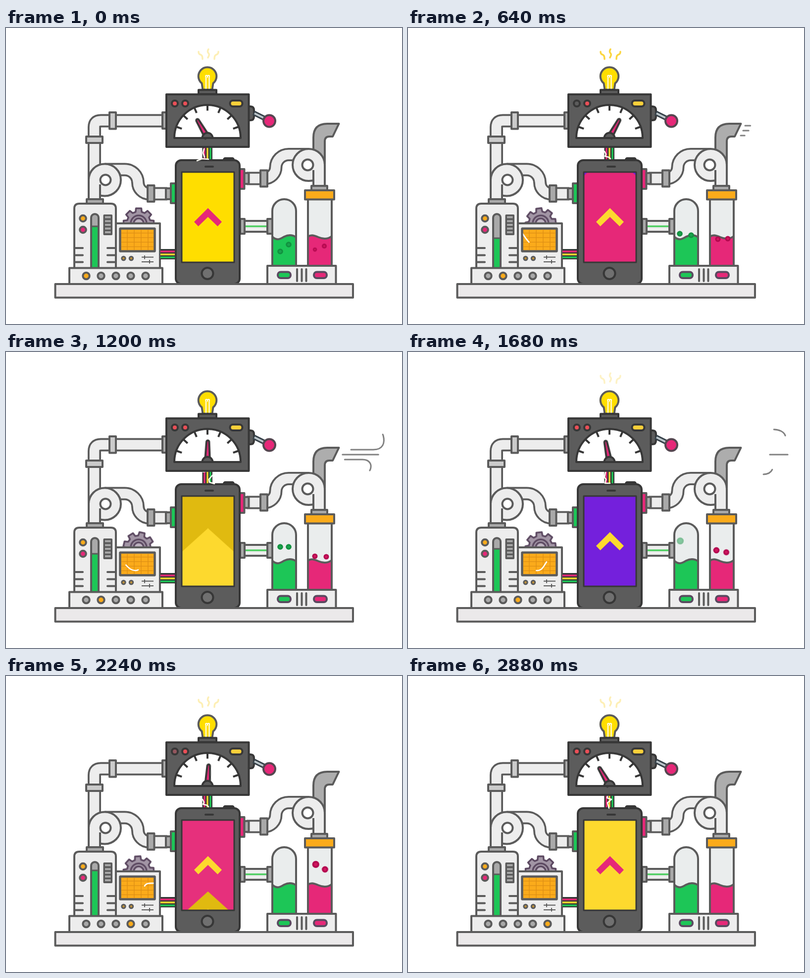
These frames come from a looping animation (800 by 600 pixels, 2.92 s). An HTML page:

```html
<!DOCTYPE html>
<html lang="en">
<head>
<meta charset="utf-8">
<title>Idea machine</title>
<style>
html, body { margin: 0; width: 100%; height: 100%; overflow: hidden; background: #fff; }
svg {
  display: block; width: 800px; height: 600px;
  --line: #5b5b5b; --dark: #373737; --body: #5c5c5c; --light: #ededed; --grey: #a9a9a9;
  --pink: #e62878; --sun: #fdd92e; --green: #1dc657; --orange: #fbab1b; --purple: #7420dc;
  fill: none; stroke: var(--line); stroke-width: 4; stroke-linejoin: round;
}
.light { fill: var(--light); }
.grey { fill: var(--grey); }
.mid { fill: #cbcbcb; }
.body { fill: var(--body); stroke: var(--dark); }
.pink { fill: var(--pink); }
.green { fill: var(--green); }
.orange { fill: var(--orange); }
.yellow { fill: #ffde00; }
.glass { fill: #eaeded; }
.flat { stroke: none; }
.dk { stroke: var(--dark); }
.thin { stroke-width: 2; }
.cap { stroke-linecap: round; }
.outer { stroke-width: 27; }
.inner { stroke: var(--light); stroke-width: 19.5; }
.white { stroke: #fff; }

.anim, .stage *, .lamp { animation: 2.92s linear infinite; }

/* Phone screen */
.stage .shade { animation-delay: -.06s; }
.s1 * { animation-name: rise1; } .s2 * { animation-name: rise2; }
.s3 * { animation-name: rise3; } .s4 * { animation-name: rise4; }
.s5 * { animation-name: rise5; } .s6 * { animation-name: rise6; }
@keyframes rise1 { 0%, 2.05% { transform: none; animation-timing-function: ease-in } 10.96%, 100% { transform: translateY(-235px) } }
@keyframes rise2 { 0%, 12.3% { transform: none } 21.92% { transform: translateY(-223px) } 22.7%, 100% { transform: translateY(-235px) } }
@keyframes rise3 { 0%, 37% { transform: none } 41.1% { transform: translateY(-116px) } 43.15%, 100% { transform: translateY(-235px) } }
@keyframes rise4 { 0%, 47.3% { transform: none; animation-timing-function: ease-in } 55.5%, 100% { transform: translateY(-235px) } }
@keyframes rise5 { 0%, 67.1% { transform: none } 69.86% { transform: translateY(-53px) } 71.9% { transform: translateY(-79px) } 75.3%, 100% { transform: translateY(-235px) } }
@keyframes rise6 { 0%, 76% { transform: none; animation-timing-function: ease-in } 84.2%, 100% { transform: translateY(-235px) } }
#arrow { animation-name: arrow; }
@keyframes arrow {
  0%, 6.5%, 44.5%, 49.5%, 83%, 100% { fill: #e62878 }
  7.5%, 43.2%, 50.5%, 81% { fill: #fdd92e }
}

/* Meter and bulb */
#needle { transform-origin: 407px 222px; animation-name: needle; animation-timing-function: ease-in-out; }
@keyframes needle {
  0%, 98.63%, 100% { transform: rotate(-30deg) } 21.92% { transform: rotate(29deg) }
  41.1% { transform: rotate(1deg) } 57.53% { transform: rotate(-11deg) }
  69.86% { transform: rotate(7deg) } 86.3% { transform: rotate(-3deg) }
}
#led { animation-name: led; }
@keyframes led {
  0%, 41.1%, 57.53%, 98.63%, 100% { fill: #ea4f57 }
  21.92% { fill: #5c5c5c } 69.86%, 86.3% { fill: #93565e }
}
#rays { stroke: #fbd640; stroke-width: 3.5; animation-name: rays; }
@keyframes rays {
  0%, 98.63%, 100% { opacity: .38 } 21.92% { opacity: 1 } 41.1% { opacity: 0 }
  57.53% { opacity: .3 } 69.86% { opacity: .5 } 86.3% { opacity: .22 }
}
#spark { stroke: #fffdf0; stroke-width: 2.6; animation-name: spark; animation-timing-function: step-end; }
@keyframes spark {
  0%, 30%, 64% { d: path("M400 245L398 253L401 262M386 269L396 265L409 266") }
  6%, 21.2%, 74% { d: path("M397 250L400 256L398 260L406 262L409 265") }
  12%, 40.4%, 90% { d: path("M398 243L410 241L421 239M417 250L410 258L411 264L421 267") }
  18%, 57%, 80% { d: path("M399 243L397 254L400 258L398 266L408 266") }
  36%, 69.2% { d: path("M398 242L417 241L418 252L409 262") }
  50%, 86% { d: path("M400 244L408 247L405 254L410 260L402 267") }
  98.2%, 100% { d: path("M405 238L402 247L411 250L403 257L406 268") }
}

/* Left machines */
#level { animation-name: level; }
@keyframes level {
  0%, 98.63%, 100% { transform: translateY(402px) } 21.92% { transform: translateY(426px) }
  41.1% { transform: translateY(409px) } 57.53% { transform: translateY(399px) }
  69.86% { transform: translateY(392px) } 86.3% { transform: translateY(397px) }
}
#gear { fill: #a295a5; stroke: #5d4a62; stroke-width: 3.5; transform-origin: 268px 396px; animation-name: gear; }
@keyframes gear {
  0% { transform: none } 21.92% { transform: rotate(38deg) } 41.1% { transform: rotate(58deg) }
  57.53%, 69.86% { transform: rotate(84deg) } 86.3%, 100% { transform: rotate(90deg) }
}
#trace { stroke-width: 2.6; stroke-dasharray: 34 300; animation-name: trace; }
@keyframes trace {
  0%, 4% { stroke-dashoffset: 40 } 21.92% { stroke-dashoffset: 8 } 41.1% { stroke-dashoffset: -20 }
  57.53% { stroke-dashoffset: -43 } 69.86% { stroke-dashoffset: -62 }
  86.3% { stroke-dashoffset: -92 } 91%, 100% { stroke-dashoffset: -104 }
}
.lamp { fill: var(--orange); animation-timing-function: step-end; }
.lamp:nth-child(1) { animation-name: lamp1; } .lamp:nth-child(2) { animation-name: lamp2; }
.lamp:nth-child(3) { animation-name: lamp3; } .lamp:nth-child(4) { animation-name: lamp4; }
.lamp:nth-child(5) { animation-name: lamp5; }
@keyframes lamp1 { 0% { fill: #fbab1b } 20.5%, 100% { fill: #a9a9a9 } }
@keyframes lamp2 { 0%, 43.1% { fill: #a9a9a9 } 20.5% { fill: #fbab1b } }
@keyframes lamp3 { 0%, 65.7% { fill: #a9a9a9 } 43.1% { fill: #fbab1b } }
@keyframes lamp4 { 0%, 88.3% { fill: #a9a9a9 } 65.7% { fill: #fbab1b } }
@keyframes lamp5 { 0% { fill: #a9a9a9 } 88.3% { fill: #fbab1b } }

/* Bubbles and wind */
.bubble { stroke-width: 3; }
.bubble.g { fill: #1aa44e; stroke: #12903f; }
.bubble.p { fill: #d2175f; stroke: #b3084f; }
#b1 { animation-name: b1; } #b2 { animation-name: b2; } #b3 { animation-name: b3; } #b4 { animation-name: b4; }
@keyframes b1 {
  0% { transform: translate(554px, 453px); opacity: 1 } 21.92% { transform: translate(549px, 417px) }
  41.1% { transform: translate(554px, 395px) } 53% { opacity: 1 }
  57.53% { transform: translate(550px, 383px) scale(1.2); opacity: .5 }
  60%, 100% { transform: translate(550px, 380px) scale(1.5); opacity: 0 }
}
@keyframes b2 {
  0% { transform: translate(571px, 439px); opacity: 1 } 21.92% { transform: translate(572px, 420px) }
  41.1% { transform: translate(571px, 395px) } 48% { opacity: 1 }
  53%, 100% { transform: translate(572px, 381px) scale(1.5); opacity: 0 }
}
@keyframes b3 {
  0% { transform: translate(624px, 449px) scale(.75); opacity: 1 } 21.92% { transform: translate(626px, 428px) }
  41.1% { transform: translate(624px, 414px) } 57.53% { transform: translate(623px, 402px) scale(1.15) }
  69.86% { transform: translate(624.5px, 389px) scale(1.2) } 82% { opacity: 1 }
  86.3% { transform: translate(627.5px, 372px) scale(1.45); opacity: .6 }
  89%, 100% { transform: translate(628px, 369px) scale(1.7); opacity: 0 }
}
@keyframes b4 {
  0% { transform: translate(643px, 442px) scale(.9); opacity: 1 } 21.92% { transform: translate(646px, 427px) }
  41.1% { transform: translate(647px, 415px) } 57.53% { transform: translate(643px, 406px) scale(1.1) }
  69.86% { transform: translate(644px, 397px) scale(1.15) } 86.3% { transform: translate(645px, 385px) scale(1.2) }
  92% { opacity: 1 } 97%, 100% { transform: translate(646px, 372px) scale(1.6); opacity: 0 }
}
.wind { stroke: #818181; stroke-width: 3; animation-name: curl; }
.wind.mid { fill: none; animation-name: gust; }
@keyframes curl {
  0%, 18.4% { visibility: hidden; stroke-dasharray: 0 300; stroke-dashoffset: 0 }
  18.5% { visibility: visible; stroke-dasharray: 0 300; stroke-dashoffset: 0 }
  21.92% { stroke-dasharray: 8 300; stroke-dashoffset: 0 }
  41.1% { stroke-dasharray: 68 300; stroke-dashoffset: -12 }
  57.53% { stroke-dasharray: 21 300; stroke-dashoffset: -78 }
  69.86% { stroke-dasharray: 2 300; stroke-dashoffset: -97 }
  71% { visibility: visible }
  71.1%, 100% { visibility: hidden; stroke-dasharray: 0 300; stroke-dashoffset: -100 }
}
@keyframes gust {
  0%, 18.4% { visibility: hidden; stroke-dasharray: 0 300; stroke-dashoffset: 0 }
  18.5% { visibility: visible; stroke-dasharray: 0 300; stroke-dashoffset: 0 }
  21.92% { stroke-dasharray: 12 300; stroke-dashoffset: -1 }
  41.1% { stroke-dasharray: 78 300; stroke-dashoffset: -4 }
  57.53% { stroke-dasharray: 39 300; stroke-dashoffset: -59 }
  69.86% { stroke-dasharray: 4 300; stroke-dashoffset: -94 }
  71% { visibility: visible }
  71.1%, 100% { visibility: hidden; stroke-dasharray: 0 300; stroke-dashoffset: -100 }
}
</style>
</head>
<body>
<svg viewBox="0 0 800 600">
  <defs>
    <path id="pipeA" d="M320 188H191.5Q178.5 188 178.5 201V347"/>
    <path id="pipeB" d="M200 287H240A26.5 26.5 0 0 1 266.5 313A23 23 0 0 0 289 336H326"/>
    <path id="pipeC" d="M486 305H522A23 23 0 0 0 545 282A26 26 0 0 1 571 256.5H612"/>
    <path id="wave" d="M355 523L408 475L461 523V770H355Z"/>
    <clipPath id="screen"><rect x="355" y="292" width="106" height="183"/></clipPath>
    <clipPath id="tube"><path d="M172 487V384.500a7.500 7.500 0 0 1 15 0V487Z"/></clipPath>
  </defs>

  <!-- Left pipes -->
  <use href="#pipeA" class="outer"/><use href="#pipeA" class="inner"/>
  <rect class="mid" x="209" y="171" width="13" height="33.500"/>
  <rect class="mid" x="162" y="220" width="33" height="13"/>
  <rect class="grey" x="316" y="171" width="9" height="33"/>
  <use href="#pipeB" class="outer"/><use href="#pipeB" class="inner"/>
  <circle class="light" cx="199.500" cy="308" r="32.500"/>
  <path class="light flat" d="M167 306h23v41h-23z"/>
  <path d="M167 306V347M190 317V347"/>
  <circle cx="201" cy="308" r="10.500" fill="#fff"/>
  <rect class="grey" x="286" y="319" width="13.500" height="33"/>
  <rect class="grey" x="323" y="325" width="10" height="22"/>
  <rect class="green" x="333" y="315" width="10" height="40"/>

  <!-- Right pipes -->
  <path d="M621 265V222Q621 194 649 194H672.500L660 220H653Q644 220 644 230V275Z" fill="#adadad"/>
  <use href="#pipeC" class="outer"/><use href="#pipeC" class="inner"/>
  <circle class="light" cx="611.500" cy="277.500" r="32.500"/>
  <path class="light flat" d="M621 279h23v41h-23z"/>
  <path d="M644 277V320M621 288V320"/>
  <circle cx="609.500" cy="277.500" r="11" fill="#fff"/>
  <rect class="pink" x="472" y="286" width="9.500" height="40"/>
  <rect class="grey" x="481.500" y="294" width="9" height="22"/>
  <rect class="grey" x="514" y="288.500" width="14" height="33"/>
  <path class="light" d="M480 391H530V413H480Z"/>
  <path d="M484 402H527" stroke="#4fce62" stroke-width="3.500"/>
  <rect class="grey" x="473" y="387" width="9" height="30"/>
  <rect class="grey" x="528" y="387" width="10" height="30"/>

  <!-- Test tubes -->
  <path class="glass" d="M538 483V371a24 24 0 0 1 48 0V483Z"/>
  <path class="green" d="M538 423C548 433 556 426 562 423S577 418 586 424V483H538Z"/>
  <rect class="glass" x="610" y="347" width="48" height="136"/>
  <path class="pink" d="M610 423C617 418 624 421 631 424S648 430 658 422V483H610Z"/>
  <rect class="grey" x="617" y="320" width="32" height="9"/>
  <rect class="orange" x="604" y="329" width="59" height="18.500"/>
  <circle id="b1" class="bubble g anim" r="4.300"/>
  <circle id="b2" class="bubble g anim" r="4.300"/>
  <circle id="b3" class="bubble p anim" r="4"/>
  <circle id="b4" class="bubble p anim" r="4"/>
  <rect class="light" x="528" y="482" width="138.500" height="37"/>
  <g stroke="#5a4a60">
    <rect class="green" x="549" y="494.500" width="26" height="12.500" rx="6"/>
    <rect class="pink" x="622" y="494.500" width="26" height="12.500" rx="6"/>
  </g>
  <path class="cap" d="M588 489V513M597.500 489V513M606.500 489V513"/>

  <!-- Oscilloscope -->
  <g id="gear" class="anim"><path id="teeth"/><circle cx="268" cy="396" r="16"/><circle cx="268" cy="396" r="10" fill="#bdb2bf"/></g>
  <rect class="light" x="222" y="396" width="89" height="91"/>
  <rect class="orange" x="230.500" y="406.500" width="70" height="46"/>
  <path id="grid" stroke="#dd8f14" stroke-width="1.300"/>
  <path id="trace" class="white anim" pathLength="100" d="M231 416C240 430 250 444 262 443C275 442 277 424 285 421C289 419.500 295 420 300 420"/>
  <rect x="230.500" y="406.500" width="70" height="46"/>
  <g fill="#c0923a" stroke-width="3"><circle cx="237.500" cy="467" r="3.700"/><circle cx="253" cy="467" r="3.700"/></g>
  <path class="thin" d="M274 464.500H298M280 461V468.500M274 474H298M290 470V477.500"/>

  <!-- Boiler -->
  <rect class="grey" x="163" y="347" width="33" height="10"/>
  <path class="light" d="M138 487V366q0-10 10-10h64q10 0 10 10V487Z"/>
  <circle class="orange" cx="155.500" cy="386" r="6.300"/>
  <circle class="pink" cx="155.500" cy="409" r="6.300"/>
  <path class="grey flat" d="M172 487V384.500a7.500 7.500 0 0 1 15 0V487Z"/>
  <g clip-path="url(#tube)"><path id="level" class="anim green" stroke-width="3" d="M165 0H195V110H165Z"/></g>
  <path d="M172 487V384.500a7.500 7.500 0 0 1 15 0V487"/>
  <rect x="198.500" y="380" width="14.500" height="38" fill="#5b5b5b"/>
  <path d="M200 383.500h11.500M200 391.500h11.500M200 399h11.500M200 406.500h11.500M200 414h11.500" stroke="#a9a9a9"/>
  <path class="cap" d="M139 446H155M139 460.500H155M139 474.500H155M205 446H221M205 460.500H221M205 474.500H221"/>
  <rect class="light" x="128" y="486.500" width="188" height="32.500"/>
  <g id="lamps"></g>

  <!-- Cables -->
  <path class="flat" fill="#373737" d="M312 448H344V469H312ZM396.500 240H417V270H396.500Z"/>
  <g stroke-width="3.300">
    <path stroke="#e62878" d="M312 453H343M401 241V268"/>
    <path stroke="#fdd92e" d="M312 459H343M407 241V268"/>
    <path stroke="#1dc657" d="M312 465H343M413 241V268"/>
  </g>

  <!-- Phone -->
  <rect class="body" x="440" y="264" width="20" height="8" rx="3"/>
  <rect class="body" x="343" y="268" width="129" height="251" rx="11"/>
  <path class="dk cap" d="M403 281H418"/>
  <circle cx="407" cy="497.500" r="11.500" fill="#707070" class="dk"/>
  <g class="flat" clip-path="url(#screen)">
    <rect class="yellow" x="355" y="292" width="106" height="183"/>
    <g class="stage s1"><use href="#wave" class="shade" fill="#5c14b8"/><use href="#wave" fill="#7420dc"/></g>
    <g class="stage s2"><use href="#wave" fill="#e62878"/></g>
    <g class="stage s3"><use href="#wave" class="shade" fill="#e0ba10"/><use href="#wave" fill="#fdd92e"/></g>
    <g class="stage s4"><use href="#wave" class="shade" fill="#5c14b8"/><use href="#wave" fill="#7420dc"/></g>
    <g class="stage s5"><use href="#wave" class="shade" fill="#c42566"/><use href="#wave" fill="#e6307c"/></g>
    <g class="stage s6"><use href="#wave" class="shade" fill="#e0ba10"/><use href="#wave" fill="#fdd92e"/></g>
    <path id="arrow" class="anim" d="M408 365L380 393L388.500 402L408 383L427.500 402L436 393Z"/>
  </g>
  <rect class="dk" x="355" y="292" width="106" height="183" stroke-width="3"/>
  <path id="spark" class="anim cap" d="M400 245L398 253L401 262M386 269L396 265L409 266"/>

  <!-- Meter -->
  <path class="body" d="M490 159H494Q501 159 501 167V179Q501 187 494 187H490Z"/>
  <path d="M500 172L526 185" stroke="#37424a" stroke-width="10"/>
  <path d="M502 173L526 185" stroke="#bcc6ca" stroke-width="4"/>
  <circle class="pink" cx="532" cy="188.500" r="12" stroke="#554650"/>
  <rect class="body" x="324" y="134.500" width="166.500" height="106.500"/>
  <g class="dk">
    <circle id="led" class="anim" cx="341" cy="153" r="6"/>
    <circle cx="362" cy="153" r="6" fill="#ea4f57"/>
    <rect x="452.500" y="147" width="25" height="12" rx="6" fill="#fdd03a"/>
    <path d="M340 223A67 67 0 0 1 474 223Z" fill="#fff"/>
    <path id="ticks"/>
    <path id="needle" class="pink anim" d="M402 222L404.300 182a2.700 2.700 0 0 1 5.400 0L412 222Z"/>
    <path class="body" d="M396.500 223a10.500 10.500 0 0 1 21 0Z"/>
  </g>

  <!-- Bulb -->
  <path class="yellow" d="M397.500 125L395.500 112A18.300 18.300 0 1 1 418.500 112L416.500 125Z"/>
  <path class="white thin cap" d="M404 123V100Q402 96 405 96T407 100Q407 96 409.500 96T410.500 100V123"/>
  <rect class="body" x="389" y="125.500" width="36" height="8.500"/>
  <path id="rays" class="anim cap" d="M389 48Q389 53 393 54T397 63M409 43Q406 48 409 51T408 60M429 48Q429 53 425 54T421 63"/>

  <!-- Wind -->
  <path class="wind anim cap" pathLength="100" d="M681 198H742C762 198 766 184 762 169C759 161 749 157 738 157"/>
  <path class="wind mid anim cap" pathLength="100" d="M676 208H769"/>
  <path class="wind anim cap" pathLength="100" d="M672 218H720C735 218 738 228 737 234C736 243 728 248 717 248"/>

  <rect x="99.500" y="519" width="601.500" height="27.500" fill="#ebe9ea"/>
</svg>
<script>
const el = id => document.getElementById(id);
const polar = (cx, cy, r, deg) => {
  const a = deg * Math.PI / 180;
  return `${(cx + r * Math.sin(a)).toFixed(1)} ${(cy - r * Math.cos(a)).toFixed(1)}`;
};

// Eight teeth, each with a wide foot and a narrow tip
const teeth = [];
for (let i = 0; i < 8; i++)
  for (const [r, off] of [[24, -15], [31, -10], [31, 10], [24, 15]])
    teeth.push(polar(268, 396, r, i * 45 + off));
el('teeth').setAttribute('d', 'M' + teeth.join('L') + 'Z');

let ticks = '';
for (let k = -3; k <= 3; k++)
  ticks += `M${polar(407, 222.5, 55, k * 23.5)}L${polar(407, 222.5, 66, k * 23.5)}`;
el('ticks').setAttribute('d', ticks);

let grid = '';
for (let i = 1; i < 5; i++) grid += `M${231 + i * 14} 407V452M231 ${406.5 + i * 9.2}H300`;
el('grid').setAttribute('d', grid);

for (let i = 0; i < 5; i++) {
  const dot = document.createElementNS('http://www.w3.org/2000/svg', 'circle');
  const attrs = { class: 'lamp', cx: 162 + i * 30, cy: 502.5, r: 6.7 };
  for (const key in attrs) dot.setAttribute(key, attrs[key]);
  el('lamps').append(dot);
}
</script>
</body>
</html>
```
